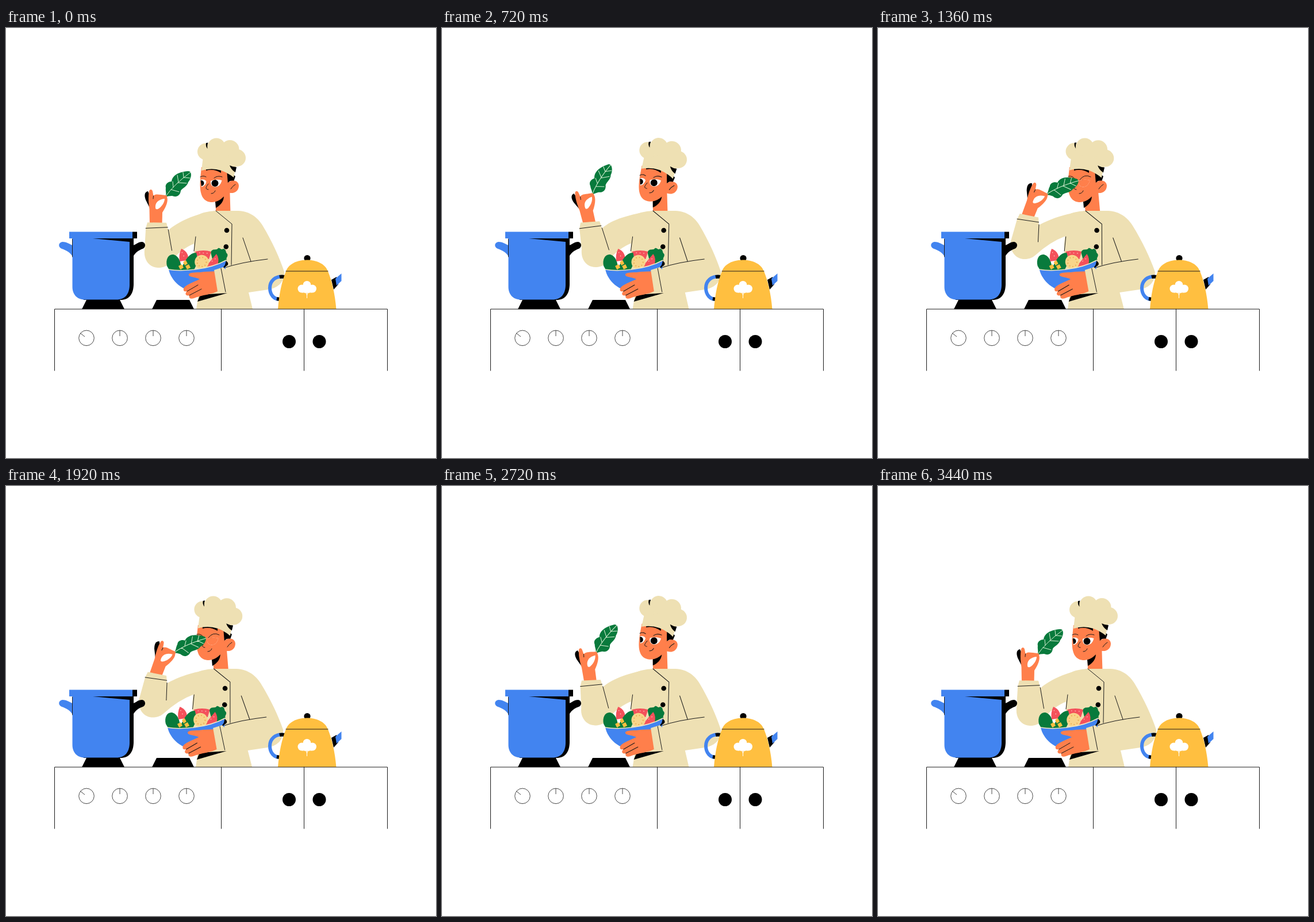
An HTML page for the animation above (3520 ms loop, 748 by 748 pixels).

```html
<!DOCTYPE html>
<html lang="en">
<head>
<meta charset="utf-8">
<title>Chef</title>
<style>
  html, body { margin: 0; width: 100%; height: 100%; overflow: hidden; background: #fff; }
  svg { display: block; width: 100vw; height: 100vh; }
  .tan { fill: #eee0b3; }
  .skin { fill: #ff7f4b; }
  .blue { fill: #4284f0; }
  .green { fill: #087a3c; }
  .red { fill: #f4515b; }
  .gold { fill: #ffbf40; }
  .white { fill: #fff; }
  .line { fill: none; stroke: #1a1a1a; stroke-linecap: round; }
  .thin { fill: none; stroke: #333; stroke-width: .9; }
  .vein { fill: none; stroke: #d9efd2; stroke-linecap: round; }
  .seeds { fill: none; stroke: #fbd9c8; stroke-width: 1.2; stroke-dasharray: 1.5 5; }
</style>
</head>
<body>
<svg viewBox="0 0 748 748">
  <defs>
    <clipPath id="eyes">
      <path d="M338.500 264Q346 262 348.500 267Q347 275 340 276.500Z"/>
      <path d="M356 266Q365 262 375.500 265Q373 276.500 363 276.500Q355 275 356 266Z"/>
    </clipPath>
  </defs>

  <path id="neck" class="skin"/>

  <g id="head">
    <path d="M364 302Q374 299 379 292Q379 305 365 313Z"/>
    <path class="skin" d="M340 242L338 262C336 288 341 303 359 303C372 302 380 293 386 284L386 246Z"/>
    <path d="M384 246L399 258L396 267Q389 263 386 271Z"/>
    <path d="M348 248Q361 244 374 252L374 244H348Z"/>
    <path class="skin" d="M384 272C387 264 404 262 405 274C405 286 393 290 384 285Z"/>
    <path class="line" d="M391 280Q394 275 399 272M352 271Q348 276 348 279Q349 281 352 281M357 288Q362 288 364 283"/>
    <g clip-path="url(#eyes)">
      <rect class="white" x="335" y="258" width="45" height="22"/>
      <circle cx="339.500" cy="270" r="5"/>
      <circle cx="363.500" cy="270" r="6"/>
      <g id="lid">
        <path class="skin" d="M330 230H385V258H330Z"/>
        <path class="line" d="M330 258H385"/>
      </g>
    </g>
    <path id="brows" class="line" d="M338 259Q343 256 348 259M362 261Q368 256 376 259"/>
    <path id="smile" class="line" d="M338 258Q346 256 350 264M358 264Q366 253 377 259"/>
    <g id="hat" class="tan">
      <path d="M344 215L340 248Q370 239 396 260L402 232L385 205L360 205Z"/>
      <circle cx="347.500" cy="215" r="14.500"/>
      <circle cx="366" cy="207" r="15.500"/>
      <circle cx="389.500" cy="211" r="16"/>
      <circle cx="402" cy="226" r="15"/>
      <path fill="#000" d="M389 239Q395 242 401 242L399 251Q392 247 389 239Z"/>
      <path fill="#000" d="M348 200L351.500 199.500Q349.500 204 350.500 210Q347 206 348 200Z"/>
    </g>
  </g>

  <g id="hand">
    <path d="M247 284C241 285 240 291 243 299L250 313L252 296Z"/>
    <path class="green" d="M277 294C280 288 277 284 278 278C276 271 283 267 288 267C289 257 300 250 317 249C325 249 322 263 317 268C315 276 307 278 304 283C303 292 296 295 289 292Q282 292 277 294Z"/>
    <path class="vein" d="M277 294Q291 273 321 251M291 277L290 267M300 268L298 256M299 269L314 270M309 260L308 251M309 260L320 261M287 281L301 285"/>
    <path class="skin" d="M250 342L249.500 315C248 305 247 294 249 284C250 280 254 280 255 284L256.500 292C260 288 266 290 278 291C281 292 280 294 280.500 296C282 302 278 312 272 321L271.500 342Z"/>
    <path class="white" d="M260 313C259 304 265 298 276 297C276 304 270 312 264 315Q260 316 260 313Z"/>
    <path class="line" d="M256.500 292L256 297"/>
  </g>

  <path id="sleeve" class="tan"/>
  <path id="folds" class="line"/>

  <g id="body">
    <path class="tan" d="M364 318H404C425 319 438 330 446 343C464 373 476 400 484 424C484 444 472 452 456 455L422 460L429 489H331L334 470L327 410V376L332 326C344 320 352 319 364 318Z"/>
    <path d="M338 464L385 461L333 476Z"/>
    <path class="line" d="M365 318L393 341L392 412M330 363L327 388M412 365L426 406M455 402Q410 407 377 418"/>
    <circle cx="384" cy="352" r="4.300"/>
    <circle cx="382.800" cy="380.500" r="4.300"/>
    <circle cx="382" cy="410" r="4.300"/>

    <path class="green" d="M356 390C360 382 366 388 369 383C373 382 373 387 378 384C384 385 381 390 385 393C387 398 382 399 384 403L362 414Z"/>
    <path class="red" d="M329 389Q344 385 357 389L353 402H335Z"/>
    <path class="green" d="M280 414C277 402 283 393 291 394C300 396 306 408 304 421H284Z"/>
    <path class="red" d="M305 384C315 388 319 397 316 404L302 406Q300 394 305 384Z"/>
    <path class="green" d="M304 421C312 401 321 390 331 391Q336 405 327 421Z"/>
    <path class="red" d="M346 417L366 393Q372 401 368 413Z"/>
    <circle cx="340.500" cy="407" r="12.300" fill="#f8d58a"/>
    <circle cx="340.500" cy="407" r="8" fill="none" stroke="#e9a94b" stroke-width="2" stroke-dasharray="1.500 4"/>
    <path class="gold" d="M300 414L306 411L309 417L303 420ZM308 407L313 404L316 410L311 413ZM312 414L318 411L321 417L315 420Z"/>
    <path class="seeds" d="M306 390L311 400M336 391L352 392M358 406L366 400"/>

    <path class="blue" d="M283 420C300 424 352 422 383 404C385 422 371 459 336 459C306 459 287 439 283 420Z"/>
    <path d="M383 404Q387 412 379 418L373 423L381 412Z"/>
    <path d="M283 420C305 424 352 421 383 404" fill="none" stroke="#f3e8c4" stroke-width="1.500"/>
    <path class="skin" d="M370 423L345 424C335 426 322 424 318 428C316 434 331 433 337 437C325 442 311 448 309 453C308 458 311 459 315 458C310 462 313 467 319 465C317 470 322 472 327 470C341 464 358 464 370 457Z"/>
    <path class="line" d="M315 458L334 447M319 465L340 454"/>
    <path class="tan" d="M362 421L378 416L400 440L385 461L368 458Z"/>
    <path class="line" d="M374 418L382 459"/>
  </g>

  <g id="pot">
    <path d="M116 366H222V445C222 463 214 473 199 473H135Z"/>
    <path class="blue" d="M115.500 365L151 366L215 372V446C215 463 207 472.500 192 472.500H137C123 472.500 115.500 463 115.500 450Z"/>
    <path class="blue" d="M110 354.500H220V366H110Z"/>
    <path d="M220 354.500H228V366H220Z"/>
    <path class="blue" d="M98 372C107 372 112 377 116 378V398C112 390 103 386 97 384C90 381 91 373 98 372Z"/>
    <path d="M237 372C229 372 226 377 221 378V398C225 390 232 386 238 384C244 381 243 373 237 372Z"/>
    <path class="line" d="M115.500 367V398"/>
    <path d="M140 473H198L206 489H132ZM262 473H319L327 489H254Z"/>
  </g>

  <g id="kettle">
    <path d="M484 433C468 430 459 441 459 452C459 465 467 472 476 472" fill="none" stroke="#4284f0" stroke-width="6"/>
    <path d="M485 433Q480 432 476 433M471 471L477 472" fill="none" stroke="#000" stroke-width="6"/>
    <path d="M566 438L575 433L578 446L570 455Z"/>
    <path class="blue" d="M573 436L583.500 427V440L575 448Z"/>
    <circle cx="524" cy="400.500" r="5.600"/>
    <path class="gold" d="M473 489Q476 450 487 423C492 410 507 403.500 523.500 403.500C540 403.500 555 410 560 423Q571 450 574.500 489Z"/>
    <path class="line" d="M487 423H560"/>
    <g class="white">
      <circle cx="514.500" cy="453.500" r="7"/>
      <circle cx="523.500" cy="447" r="7"/>
      <circle cx="533" cy="453.500" r="7"/>
      <ellipse cx="523.500" cy="456" rx="9" ry="5"/>
    </g>
    <path d="M523.500 459V470M515 460Q523 459 523.500 465Q524 459 532 460" fill="none" stroke="#fff"/>
  </g>

  <path class="line" d="M84.500 596V489H663.500V596M374.500 489V596M518.500 489V596"/>
  <path id="knobs" class="thin"/>
  <circle cx="492.500" cy="545.500" r="11.500"/>
  <circle cx="545" cy="545.500" r="11.500"/>
</svg>
<script>
const LOOP = 3520, STEP = 80;
const $ = id => document.getElementById(id);
const set = (id, name, value) => $(id).setAttribute(name, value);

// [time, value]; arm and head run from 1 (leaning back) through 0 to -1 (at the leaf)
const tracks = {
  arm:  [[0, 0], [760, 1], [1320, -1], [1840, -1], [2640, .62], [2800, .62], [3440, 0]],
  head: [[0, 0], [640, 1], [800, 1], [1320, -1], [1840, -1], [2320, 1], [2720, 1], [3440, 0]],
  lid:  [[0, 0], [960, 0], [1200, 1], [2080, 1], [2400, 0]]
};

const rest = { x: 261, y: 338, turn: 0, cuff: -1, ex: 265, ey: 393 };
const back = { x: 256, y: 337, turn: -14, cuff: -6, ex: 267, ey: 392 };
const near = { x: 261.5, y: 325.5, turn: 21, cuff: 10, ex: 255, ey: 378 };

function at(keys, t) {
  let i = keys.length - 1;
  while (keys[i][0] > t) i--;
  if (i === keys.length - 1) return keys[i][1];
  const [t0, a] = keys[i], [t1, b] = keys[i + 1];
  return a + (b - a) * (1 - Math.cos(Math.PI * (t - t0) / (t1 - t0))) / 2;
}

function armPose(p) {
  const goal = p > 0 ? back : near, pose = {};
  for (const k in rest) pose[k] = rest[k] + (goal[k] - rest[k]) * Math.abs(p);
  return pose;
}

// the cuff turns with the wrist, the lower sleeve hangs around the elbow
function drawArm(p, lean) {
  const { x, y, turn, cuff, ex, ey } = armPose(p);
  const a = cuff * Math.PI / 180, cos = Math.cos(a), sin = Math.sin(a);
  const wrist = (u, v) => `${x + u * cos - v * sin} ${y + u * sin + v * cos} `;
  const elbow = (u, v) => `${ex + u} ${ey + v} `;
  const chest = (u, v) => `${u + lean} ${v} `;
  const drop = (ey - rest.ey) * .8;
  set('sleeve', 'd',
    `M${wrist(-15, 0)}L${wrist(18, 1)}L${wrist(20, 9)}L${wrist(21, 14)}` +
    `C${wrist(39, 0)}${chest(325, 324)}${chest(365, 318)}L${chest(352, 358)}L${chest(330, 374 + drop)}` +
    `Q${chest(303, 384 + drop)}${elbow(19, 17)}C${elbow(12, 23)}${elbow(6, 24)}${elbow(0, 24)}` +
    `C${elbow(-15, 24)}${elbow(-26, 11)}${elbow(-24, -7)}L${wrist(-18, 10)}Z`);
  set('folds', 'd', `M${wrist(-18, 10)}L${wrist(20, 9)}M${wrist(21, 13)}L${elbow(23.5, -6)}`);
  set('hand', 'transform', `translate(${x} ${y}) rotate(${turn}) translate(-261 -338)`);
}

function draw(t) {
  const arm = at(tracks.arm, t), head = at(tracks.head, t), lid = at(tracks.lid, t);
  const up = Math.max(head, 0), down = Math.max(-head, 0);
  const lean = 2 * up - 4 * down, shift = 2 * up - 7 * down;
  const k = lean / 232;
  set('body', 'transform', `matrix(1 0 ${-k} 1 ${550 * k} 0)`);
  set('neck', 'd', `M${364.5 + shift} 285L${370 + shift} 272H${389 + shift}L${390.5 + lean} 322H${365 + lean}Z`);
  set('head', 'transform', `translate(${shift} 0) rotate(${4.6 * up} 375 310)`);
  set('hat', 'transform', `rotate(${Math.abs(head)} 370 247)`);
  set('lid', 'transform', `translate(0 ${lid * 21})`);
  const shut = lid > .8;
  set('brows', 'visibility', shut ? 'hidden' : 'visible');
  set('smile', 'visibility', shut ? 'visible' : 'hidden');
  drawArm(arm, lean);
}

let knobs = '';
for (let i = 0; i < 4; i++) {
  const x = 140 + 58 * i, r = 13.3;
  knobs += `M${x - r} 539.3a${r} ${r} 0 1 0 ${2 * r} 0a${r} ${r} 0 1 0 ${-2 * r} 0`;
  knobs += i ? `M${x} 526v10` : `M${x - 10.5} 531l7.500 6`;
}
set('knobs', 'd', knobs);

const start = performance.now();
function tick() {
  const t = (performance.now() - start) % LOOP;
  draw(Math.floor(t / STEP) * STEP);
  requestAnimationFrame(tick);
}
tick();
</script>
</body>
</html>
```
